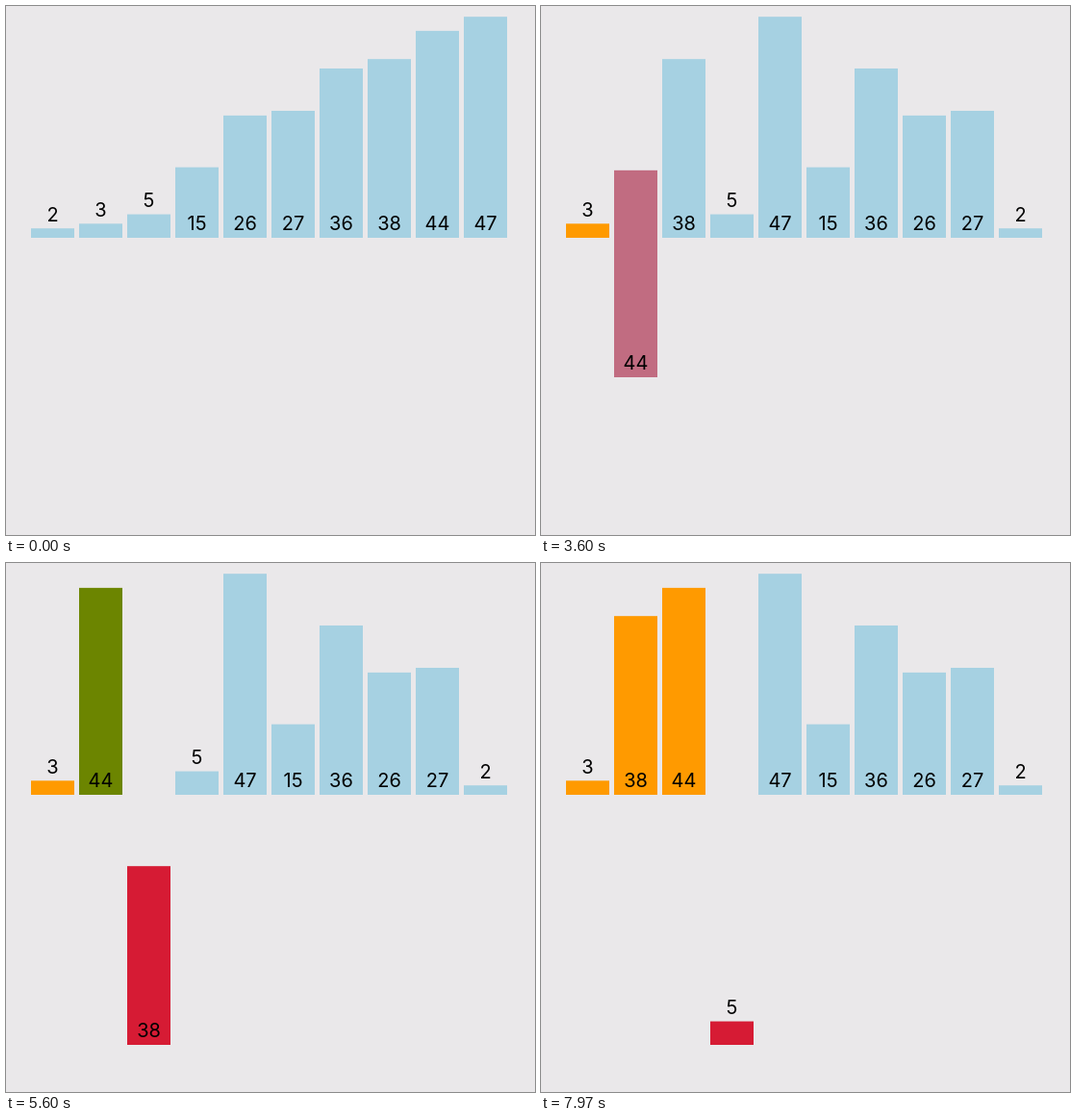
An HTML page that plays this animation: 550 px wide and 550 px high, repeating every 8 s.

```html
<!DOCTYPE html>
<html lang="en">
<head>
<meta charset="utf-8">
<title>Insertion sort</title>
<style>
  html, body { margin: 0; width: 100%; height: 100%; overflow: hidden; background: #eae8ea; }
  svg { display: block; width: 550px; height: 550px; }
  text { font: 20px Inter, Roboto, "Liberation Sans", sans-serif; text-anchor: middle; fill: #000; }
</style>
</head>
<body>
<svg id="stage" viewBox="0 0 550 550"><g id="bars"></g><g id="labels"></g></svg>
<script>
const LOOP = 8000, FADE = 250;
const BASE = 241, DROP = 260, UNIT = 4.89, GAP = 50, LEFT = 26, WIDTH = 45;
const BLUE = [166, 209, 226], ORANGE = [255, 154, 0], RED = [214, 27, 52], GREEN = [2, 117, 0];

const sorted = [2, 3, 5, 15, 26, 27, 36, 38, 44, 47];
const shuffled = [3, 44, 38, 5, 47, 15, 36, 26, 27, 2];

// Each step: start time, then the properties that change, by bar value
const steps = [
  [1951, Object.fromEntries(shuffled.map((v, i) => [v, { slot: i }]))],
  [2970, { 3: { color: ORANGE } }],
  [3470, { 44: { color: RED, down: 1 } }],
  [3970, { 3: { color: GREEN } }],
  [4470, { 3: { color: ORANGE }, 44: { color: ORANGE, down: 0 } }],
  [4970, { 38: { color: RED, down: 1 } }],
  [5468, { 44: { color: GREEN } }],
  [5963, { 38: { slot: 1 }, 44: { slot: 2 } }],
  [6465, { 3: { color: GREEN }, 44: { color: ORANGE } }],
  [6967, { 3: { color: ORANGE }, 38: { color: ORANGE, down: 0 } }],
  [7468, { 5: { color: RED, down: 1 } }],
  [7969, { 44: { color: GREEN } }]
];

const ease = t => t < 0.5 ? 4 * t ** 3 : 1 - 4 * (1 - t) ** 3;
const mix = (a, b, k) => Array.isArray(a) ? a.map((n, i) => mix(n, b[i], k)) : a + (b - a) * k;

function add(parent, tag, attrs) {
  const el = document.createElementNS("http://www.w3.org/2000/svg", tag);
  for (const key in attrs) el.setAttribute(key, attrs[key]);
  return document.getElementById(parent).appendChild(el);
}

const items = sorted.map((value, slot) => {
  const height = value * UNIT;
  const bar = add("bars", "rect", { y: BASE - height, width: WIDTH, height });
  const y = value < 10 ? BASE - height - 7.5 : BASE - 8;
  const label = add("labels", "text", { x: WIDTH / 2, y });
  label.textContent = value;
  return { value, slot, bar, label };
});

function poseAt(item, time) {
  const pose = { slot: item.slot, down: 0, color: BLUE };
  for (const [start, changes] of steps) {
    if (time <= start) break;
    const k = ease(Math.min(1, (time - start) / FADE));
    const change = changes[item.value];
    for (const key in change) pose[key] = mix(pose[key], change[key], k);
  }
  return pose;
}

function draw(time) {
  for (const item of items) {
    const { slot, down, color } = poseAt(item, time);
    const move = `translate(${LEFT + slot * GAP} ${down * DROP})`;
    item.bar.setAttribute("transform", move);
    item.label.setAttribute("transform", move);
    item.bar.setAttribute("fill", `rgb(${color.map(Math.round)})`);
  }
}

let origin;
function tick(now) {
  origin ??= now;
  draw((now - origin) % LOOP);
  requestAnimationFrame(tick);
}
draw(0);
requestAnimationFrame(tick);
</script>
</body>
</html>
```
